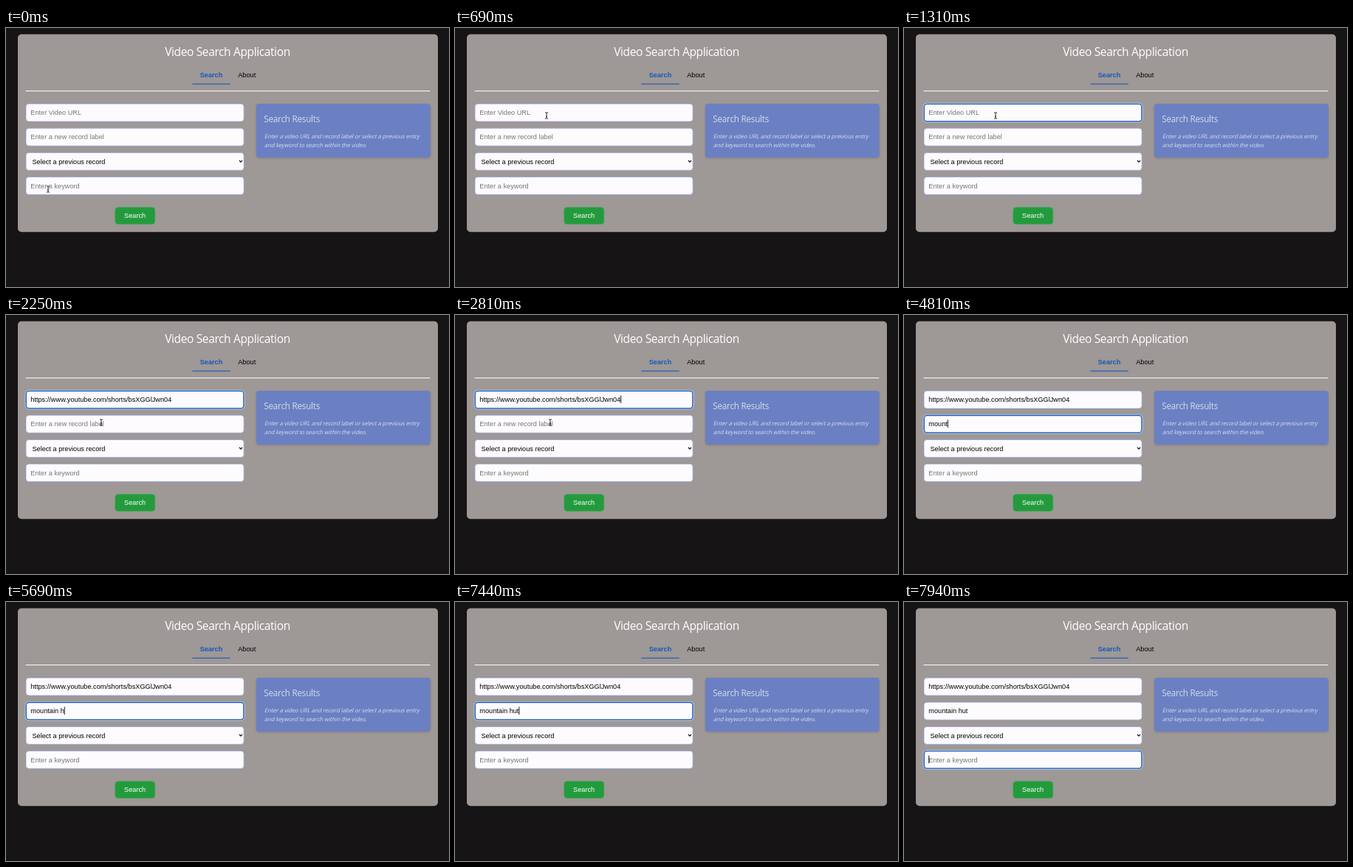
Write an HTML page that moves like this. It is 600 by 352 pixels and loops after 8 s.

```html
<!DOCTYPE html>
<html lang="en">
<head>
<meta charset="utf-8">
<title>Video Search Application</title>
<style>
  html, body { margin: 0; width: 100%; height: 100%; overflow: hidden; background: #161415; }
  svg { display: block; width: 600px; height: 352px; }
  text { font: 9.2px "Liberation Sans", Arial, sans-serif; white-space: pre; }
  .ui { font-family: "Open Sans", "Noto Sans", sans-serif; }
  .title { font-size: 15.6px; letter-spacing: -.41px; fill: #fff; }
  .heading { font-size: 11.7px; letter-spacing: -.23px; fill: #d6daea; }
  .hint { font-size: 7.8px; letter-spacing: -.135px; fill: #d9ddec; }
  .mid { text-anchor: middle; }
  .active { font-weight: bold; fill: #1559bd; }
  .box { fill: #fdfbfe; stroke: #8b9ce0; stroke-width: .7; }
  .halo { fill: none; stroke: #c3d5f5; stroke-width: 1; }
  .ring { fill: none; stroke: #1760bb; stroke-width: 1.3; }
</style>
</head>
<body>
<svg viewBox="0 0 600 352">
  <defs>
    <filter id="soft" x="-10%" y="-20%" width="120%" height="140%"><feGaussianBlur stdDeviation="1.6"/></filter>
  </defs>
  <rect width="600" height="352" fill="#161415"/>
  <rect x="16" y="8.5" width="569" height="268.8" rx="5" fill="#9e9896"/>
  <text class="ui title mid" x="300" y="38">Video Search Application</text>
  <text class="active mid" x="278" y="67">Search</text>
  <text class="mid" x="326.2" y="67">About</text>
  <rect x="252.4" y="75.6" width="51.4" height="1.1" fill="#1559bd"/>
  <rect x="26.5" y="85" width="547.8" height="1.1" fill="#f8f6f7"/>

  <rect x="339" y="104" width="236" height="73" rx="4" fill="#000" opacity=".16" filter="url(#soft)"/>
  <rect x="339" y="103" width="235.6" height="73" rx="4" fill="#6a80c3"/>
  <text class="ui heading" x="349.3" y="127.6">Search Results</text>
  <g transform="translate(349.8 150) skewX(-14)">
    <text class="ui hint">Enter a video URL and record label or select a previous entry</text>
  </g>
  <g transform="translate(349.8 162.4) skewX(-14)">
    <text class="ui hint">and keyword to search within the video.</text>
  </g>

  <g id="form"></g>
  <path d="M316 180l2 2.2 2-2.2" fill="none" stroke="#111" stroke-width="1.2"/>
  <rect x="147.9" y="243.8" width="53.8" height="22.8" rx="4" fill="#239b3d" stroke="#30a949" stroke-width=".7"/>
  <text class="mid" x="174.6" y="258.2" fill="#fff">Search</text>

  <rect id="caret" width=".9" height="10.6"/>
  <path id="mouse" d="M-2-4.3Q0-4.3 0-3.2Q0-4.3 2-4.3M0-3.4V3.4M-2 4.3Q0 4.3 0 3.2Q0 4.3 2 4.3M-1 1.2H1"
        fill="none" stroke="#151515" stroke-width=".9"/>
</svg>
<script>
const LOOP = 8000, BLINK = 500, FADE = 150, LEFT = 33.3;
const $ = id => document.getElementById(id);

function add(parent, name, attrs) {
  const el = document.createElementNS("http://www.w3.org/2000/svg", name);
  for (const key in attrs) el.setAttribute(key, attrs[key]);
  return parent.appendChild(el);
}

// One row of the form: box, focus ring and text.
function makeField(y, hint, select) {
  const form = $("form");
  add(form, "rect", { class: "box", x: 27, y, width: 295.2, height: 24, rx: 4 });
  const focus = add(form, "g", { opacity: 0 });
  add(focus, "rect", { class: "halo", x: 26.2, y: y - .8, width: 296.8, height: 25.6, rx: 4.8 });
  add(focus, "rect", { class: "ring", x: 27.3, y: y + .3, width: 294.6, height: 23.4, rx: 3.8 });
  const label = add(form, "text", { x: select ? 35.4 : LEFT, y: y + 15.1 });
  label.textContent = hint;
  label.setAttribute("fill", select ? "#000" : "#757575");
  return { y, hint, focus, label };
}

const fields = [
  makeField(103.1, "Enter Video URL"),
  makeField(136.2, "Enter a new record label"),
  makeField(169.4, "Select a previous record", true),
  makeField(202.4, "Enter a keyword")
];

const url = "https://www.youtube.com/shorts/bsXGGlJwn04";
const pasteAt = 1700;
const word = "mountain hut";
const keyTimes = [3740, 3900, 4310, 4380, 4810, 4980, 5120, 5250, 5440, 5630, 5810, 6060];
const focusSteps = [[780, 0], [3250, 1], [7690, 3]];   // time, field
const caretResets = [780, pasteAt, 3250, ...keyTimes, 7690];

// time, x, y
const mousePath = [[0, 57, 219], [130, 57, 219], [680, 124, 119], [1750, 124, 119], [2150, 129, 146], [LOOP, 129, 146]];

const ease = p => p * p * (3 - 2 * p);
const clamp = p => Math.max(0, Math.min(1, p));

function mouseAt(t) {
  const i = mousePath.findIndex(p => p[0] > t);
  const [t0, x0, y0] = mousePath[i - 1], [t1, x1, y1] = mousePath[i];
  const p = ease((t - t0) / (t1 - t0));
  return [x0 + (x1 - x0) * p, y0 + (y1 - y0) * p];
}

function setText(field, value) {
  const shown = value || field.hint;
  if (field.label.textContent !== shown) field.label.textContent = shown;
  field.label.setAttribute("fill", value ? "#000" : "#757575");
}

function draw(t) {
  const values = [t >= pasteAt ? url : "", word.slice(0, keyTimes.filter(k => k <= t).length), "", ""];
  [0, 1, 3].forEach(i => setText(fields[i], values[i]));

  const step = focusSteps.filter(s => s[0] <= t).pop();
  fields.forEach((f, i) => {
    const on = step && step[1] === i;
    f.focus.setAttribute("opacity", on ? clamp((t - step[0]) / FADE) : 0);
  });

  const caret = $("caret");
  const since = t - caretResets.filter(k => k <= t).pop();
  const lit = step && Math.floor(since / BLINK) % 2 === 0;
  caret.setAttribute("visibility", lit ? "visible" : "hidden");
  if (lit) {
    const f = fields[step[1]];
    const width = values[step[1]] ? f.label.getComputedTextLength() : 0;
    caret.setAttribute("x", LEFT + width);
    caret.setAttribute("y", f.y + 6.2);
  }

  // The pointer hides while typing.
  const mouse = $("mouse");
  mouse.setAttribute("visibility", t < keyTimes[0] ? "visible" : "hidden");
  mouse.setAttribute("transform", `translate(${mouseAt(t)})`);
}

const start = performance.now();
function tick(now) {
  draw(Math.max(0, now - start) % LOOP);
  requestAnimationFrame(tick);
}
draw(0);
requestAnimationFrame(tick);
</script>
</body>
</html>
```
